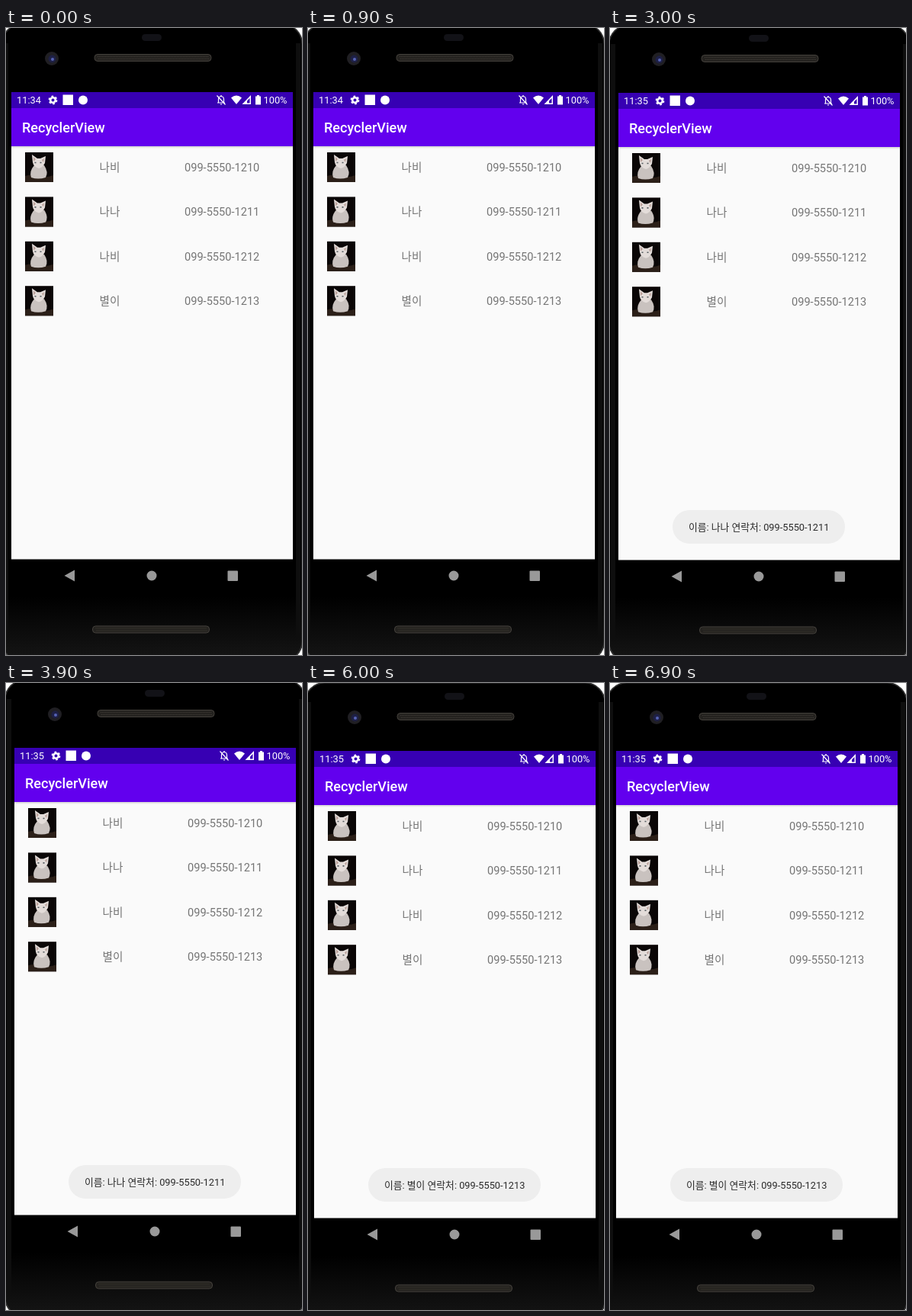
Write an HTML page that moves like this. It is 388 by 822 pixels and loops after 7500 ms.

```html
<!DOCTYPE html>
<html lang="ko">
<head>
<meta charset="utf-8">
<title>Contact list</title>
<style>
  html, body { margin: 0; width: 100%; height: 100%; overflow: hidden; background: #fff; }
  svg { display: block; width: 100%; height: 100%; }
  text { font-family: Roboto, 'Noto Sans CJK KR', 'Noto Sans CJK', sans-serif; }
  .status { font-size: 12.8px; fill: #fff; }
  .title { font-size: 18.1px; font-weight: 500; fill: #fff; }
  .row { font-size: 14.6px; fill: #757575; }
  .toast text { font-size: 12.8px; fill: #2b2b2b; }

  #phone { animation: place 7.5s step-end infinite; }
  @keyframes place {
    0% { transform: translate(0, 0); }
    20% { transform: translate(0, 3px); }
    40% { transform: translate(4px, 1px); }
    60% { transform: translate(1px, -1px); }
    80% { transform: translate(1px, 5px); }
  }
  .toast { animation: toast 7.5s step-end infinite; animation-delay: calc((var(--slot) - 5) * 1.5s); }
  @keyframes toast { 0% { visibility: visible; } 20%, 100% { visibility: hidden; } }
  .early { animation: early 7.5s step-end infinite; }
  @keyframes early { 0% { visibility: visible; } 40%, 100% { visibility: hidden; } }
  .late { animation: late 7.5s step-end infinite; }
  @keyframes late { 0% { visibility: hidden; } 40%, 100% { visibility: visible; } }
</style>
</head>
<body>
<svg viewBox="0 0 388 822">
  <defs>
    <linearGradient id="chin" x1="0" y1="0" x2="0" y2="1">
      <stop offset="0" stop-color="#000"/>
      <stop offset="1" stop-color="#161616"/>
    </linearGradient>
    <linearGradient id="shade" x1="0" y1="0" x2="0" y2="1">
      <stop offset="0" stop-color="#d2d2d2"/>
      <stop offset="1" stop-color="#fafafa"/>
    </linearGradient>
    <clipPath id="shell"><rect x="-6" y="-6" width="395" height="837" rx="27"/></clipPath>
    <g id="grille">
      <rect width="153" height="9" rx="4" fill="#24221f" stroke="#44413c"/>
      <path d="M4 3H150M5 6H150" stroke="#403c37" stroke-dasharray="1 1"/>
    </g>
    <g id="cat">
      <rect width="37" height="39" fill="#0a0606"/>
      <path d="M0 31Q9 28 18 31T37 30V39H0Z" fill="#2b1f18"/>
      <path d="M12 17Q5 25 8 33Q17 36 27 33Q31 26 25 17Z" fill="#c9c2bf"/>
      <path d="M9 3L16 8H20L27 5L26 14Q23 20 18 21Q11 19 10 13Z" fill="#e3dcd9"/>
      <path d="M11 6L14 9L11 12ZM25 8L22 10L24 13Z" fill="#b99f98"/>
      <path d="M12.500 13.500h2M19.500 13.500h2" stroke="#555b60" stroke-width="1.600"/>
    </g>
  </defs>

  <g id="phone">
    <g clip-path="url(#shell)">
      <rect x="-6" y="-6" width="395" height="837" fill="#000"/>
      <rect x="-6" y="745" width="395" height="86" fill="url(#chin)"/>
      <path d="M0 20V800M383 20V800" stroke="#0e0e0e" stroke-width="6"/>
      <rect x="-6" y="-6" width="395" height="837" rx="27" fill="none" stroke="#383838" stroke-width="3"/>
    </g>
    <rect x="178" y="8" width="26" height="9" rx="4.500" fill="#121217"/>
    <circle cx="60" cy="40" r="9" fill="#201f23"/>
    <circle cx="60.500" cy="40.500" r="5" fill="#1e2045"/>
    <circle cx="61" cy="41" r="2" fill="#5662b4"/>
    <use href="#grille" x="116" y="34.500"/>
    <use href="#grille" x="113.500" y="784"/>

    <rect x="7" y="84" width="369" height="612.500" fill="#fafafa"/>
    <rect x="7" y="155" width="369" height="3" fill="url(#shade)"/>
    <rect x="7" y="84" width="369" height="21" fill="#3700b3"/>
    <rect x="7" y="105" width="369" height="50" fill="#6200ee"/>

    <text class="status early" x="14" y="99">11:34</text>
    <text class="status late" x="14" y="99">11:35</text>
    <text class="status" x="337.500" y="99">100%</text>
    <g fill="#fff">
      <circle cx="61.500" cy="94.500" r="3.300" fill="none" stroke="#fff" stroke-width="2.600"/>
      <circle cx="61.500" cy="94.500" r="5" fill="none" stroke="#fff" stroke-width="1.800" stroke-dasharray="2.618"/>
      <rect x="74.500" y="87.500" width="13.500" height="13.500"/>
      <circle cx="101" cy="94.500" r="6"/>
      <path d="M295 91.500Q302 85.500 309 91.500L302 100Z"/>
      <path d="M321 88V100H309.500Z"/>
      <path d="M319.500 92V98.500H316V95.500Z" fill="#3700b3"/>
      <path d="M327 89.500H329V88H332V89.500H334V100.500H327Z"/>
    </g>
    <g fill="none" stroke="#fff" stroke-width="1.200">
      <path d="M278.500 98V93.500Q278.500 90 282 89.500Q285.500 90 285.500 93.500V98M277 98H287M276.500 88.500L287.500 100.500"/>
      <path d="M281 100H283M282 88V90"/>
    </g>

    <text class="title" x="20.900" y="137">RecyclerView</text>
    <g id="list"></g>

    <g fill="#999">
      <path d="M76.500 718L90 710.500V725.500Z"/>
      <circle cx="191" cy="718" r="6.500"/>
      <rect x="290.500" y="711.500" width="13.500" height="13.500" rx="1"/>
    </g>
  </g>
</svg>
<script>
  const names = ['나비', '나나', '나비', '별이'];
  const phoneNo = i => `099-5550-121${i}`;

  const row = (name, i) => `
    <g transform="translate(0 ${(i * 58.4).toFixed(1)})">
      <use href="#cat" x="25" y="163"/>
      <text class="row" x="122.500" y="188">${name}</text>
      <text class="row" x="234" y="188">${phoneNo(i)}</text>
    </g>`;

  const toast = (name, i) => `
    <g class="toast" style="--slot:${i + 1}">
      <rect x="78" y="631" width="226" height="44" rx="22" fill="#eee"/>
      <text x="191.200" y="657.500" text-anchor="middle">이름: ${name} 연락처: ${phoneNo(i)}</text>
    </g>`;

  document.getElementById('list').innerHTML =
    names.map(row).join('') + names.map(toast).join('');
</script>
</body>
</html>
```
